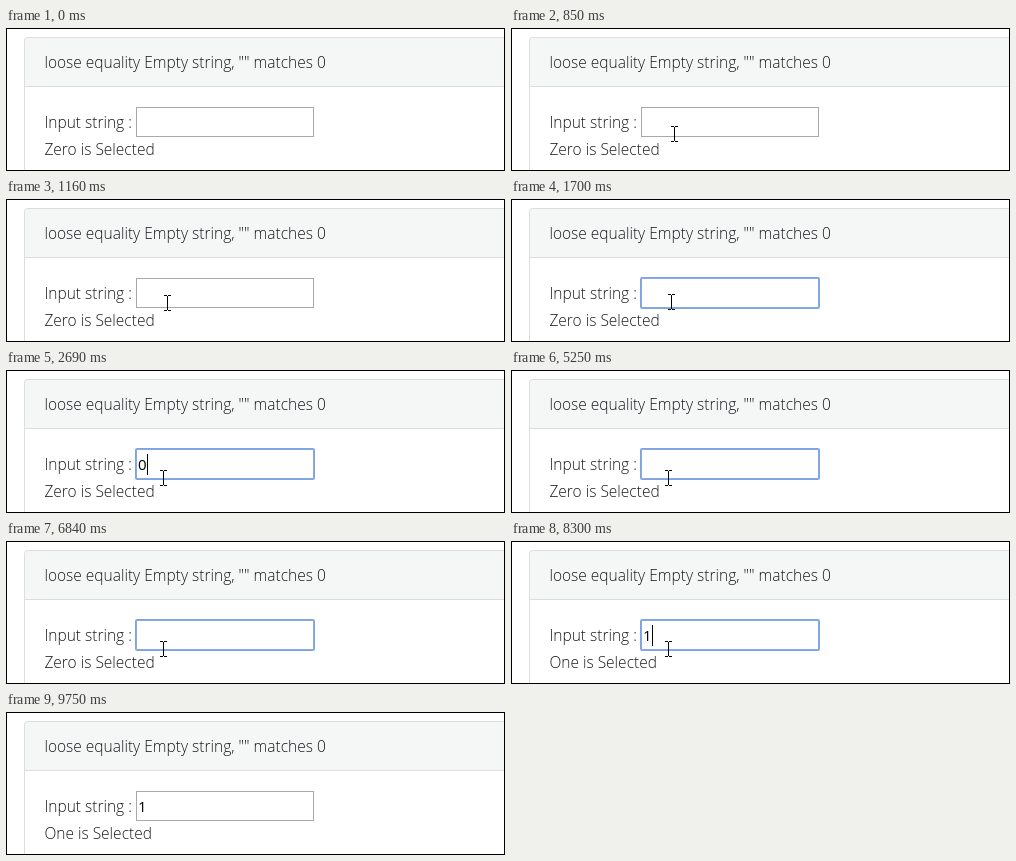
These frames come from a looping animation (499x143 px, 9.83 s). An HTML page:

```html
<!DOCTYPE html>
<html lang="en">
<head>
<meta charset="utf-8">
<title>Loose equality demo</title>
<style>
  html, body { margin: 0; width: 100%; height: 100%; overflow: hidden; background: #fff; }
  svg { display: block; }
  text { font: 300 15.5px "Open Sans", "Noto Sans", sans-serif; fill: #16191c; white-space: pre; }
  #value { font-size: 15px; font-weight: 400; fill: #000; }
  .crisp { shape-rendering: crispEdges; }
</style>
</head>
<body>
<svg width="499" height="143" viewBox="0 0 499 143">
  <rect width="499" height="143" fill="#fff"/>
  <path d="M18.5 58.5V12.5q0-3 3-3H499V58.5Z" fill="#f5f7f7"/>
  <path d="M18.5 143V12.5q0-3 3-3H499M18.5 58.5H499" fill="none" stroke="#dcdddd"/>
  <text x="38.4" y="40">loose equality Empty string, "" matches 0</text>
  <text x="38.4" y="100">Input string :</text>
  <text x="38.4" y="127" id="status"></text>

  <rect class="crisp" x="130.5" y="79.5" width="177" height="29" fill="#fff" stroke="#a9a9a9"/>
  <g id="focus" fill="none">
    <rect x="129.5" y="78.5" width="179" height="31" rx="1" stroke="#7ba3ea"/>
    <rect x="130.5" y="79.5" width="177" height="29" stroke="#8aa9e0"/>
  </g>
  <text x="132" y="100" id="value"></text>
  <rect class="crisp" id="caret" y="84" width="1" height="21"/>

  <g id="pointer">
    <path id="beam" class="crisp" d="M-3 -7.5H0M1 -7.5H4M-3 7.5H0M1 7.5H4M.5 -7V7" fill="none" stroke="#000"/>
    <path id="arrow" d="M.5 .5V16.5L4.2 13L6.8 18.5L9 17.5L6.5 12H11.5Z" fill="#fff" stroke="#000"/>
  </g>
  <rect class="crisp" x=".5" y=".5" width="498" height="142" fill="none" stroke="#000"/>
</svg>
<script>
const LOOP = 9830, FOCUS_START = 1210, FOCUS_END = 9750;
const $ = id => document.getElementById(id);
const show = (id, visible) => $(id).setAttribute("visibility", visible ? "visible" : "hidden");

// [time, typed value, caret visible]
const edits = [
  [0, "", 0], [FOCUS_START, "", 1], [1700, "", 0], [2230, "", 1],
  [2690, "0", 1], [3220, "0", 0], [3560, "", 0], [3720, "", 1], [4250, "", 0],
  [4500, "1", 1], [5000, "1", 0], [5250, "", 0], [5550, "", 1],
  [5990, "0", 1], [6480, "0", 0], [6840, "", 0], [7020, "", 1],
  [7270, "1", 1], [7800, "1", 0], [8300, "1", 1], [8850, "1", 0],
  [9410, "1", 1], [FOCUS_END, "1", 0]
];

// [time, x, y, glides towards the next point]; the last entry hides the pointer
const moves = [
  [640, 176, 136, 1], [850, 163, 106, 1], [1450, 160, 103, 0],
  [1780, 157, 108, 0], [8850, 236, 107, 0], [8890, 312, 100, 0], [8930]
];

const indexAt = (list, t) => list.findLastIndex(item => item[0] <= t);

function pointerAt(t) {
  const i = indexAt(moves, t);
  if (i < 0 || i === moves.length - 1) return null;
  const [start, x, y, glides] = moves[i];
  if (!glides) return [x, y];
  const [end, nextX, nextY] = moves[i + 1];
  const eased = 1 - (1 - (t - start) / (end - start)) ** 2;
  return [Math.round(x + (nextX - x) * eased), Math.round(y + (nextY - y) * eased)];
}

function render(t) {
  const [, value, caret] = edits[indexAt(edits, t)];
  $("value").textContent = value;
  $("status").textContent = (value === "1" ? "One" : "Zero") + " is Selected";
  $("caret").setAttribute("x", value ? 141 : 132);
  show("caret", caret);
  show("focus", t >= FOCUS_START && t < FOCUS_END);

  const position = pointerAt(t);
  const [x, y] = position || [0, 0];
  const overInput = x >= 130 && x < 308 && y >= 79 && y < 109;
  $("pointer").setAttribute("transform", `translate(${x} ${y})`);
  show("beam", position && overInput);
  show("arrow", position && !overInput);
}

const origin = performance.now();
function tick() {
  render((performance.now() - origin) % LOOP);
  requestAnimationFrame(tick);
}
tick();
</script>
</body>
</html>
```
